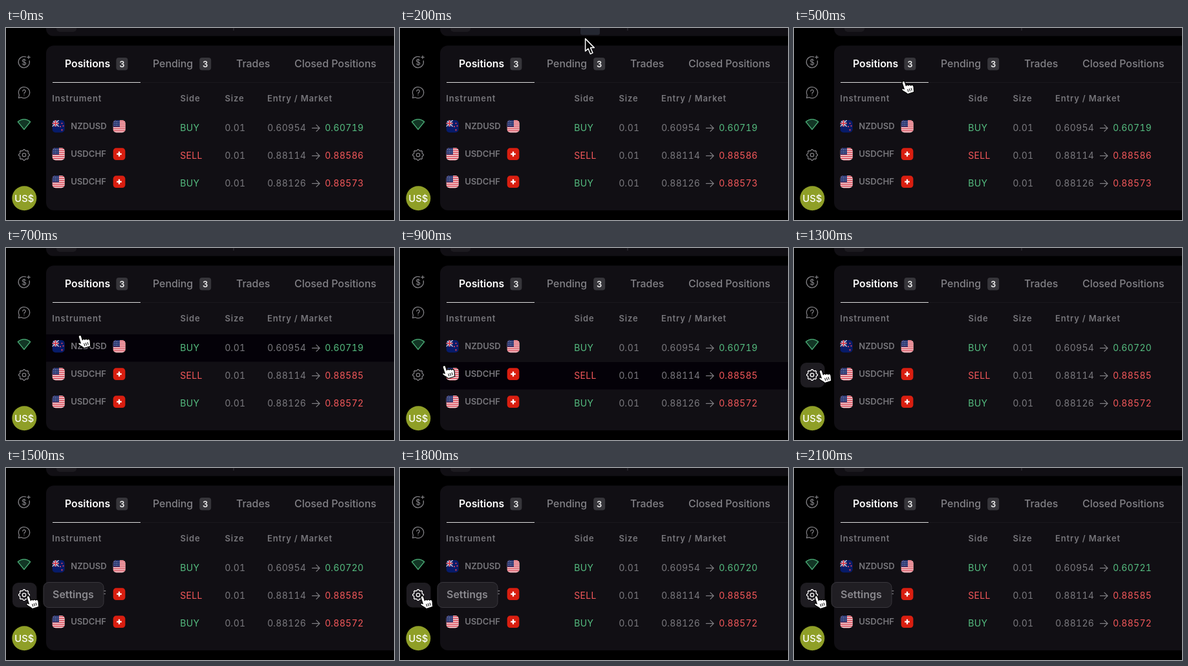
These frames come from a looping animation (600 by 298 pixels, 2.2 s). An HTML page:

```html
<!DOCTYPE html>
<html lang="en">
<head>
<meta charset="utf-8">
<title>Positions</title>
<style>
html, body { margin: 0; width: 100%; height: 100%; overflow: hidden; background: #000; }
svg { display: block; font-family: Inter, "Liberation Sans", sans-serif; }
.tab { font-size: 15.9px; font-weight: 500; fill: #828186; }
.tab.on { font-size: 15.8px; font-weight: 600; fill: #fff; }
.badge { font-size: 13px; font-weight: 600; fill: #eee; text-anchor: middle; }
.head { font-size: 13px; font-weight: 600; letter-spacing: .85px; fill: #77767b; }
.pair { font-size: 13.1px; font-weight: 600; fill: #77767b; }
.cell { font-size: 14px; letter-spacing: .3px; fill: #7b7a7f; }
.digits { font-feature-settings: "tnum"; }
.up { fill: #55bd80; }
.down { fill: #f4585a; }
.icon { fill: none; stroke: #7f7e82; stroke-width: 1.3; stroke-linecap: round; stroke-linejoin: round; }
.tip { font-size: 16px; font-weight: 600; fill: #8a898e; }
</style>
</head>
<body>
<svg id="stage" width="600" height="298" viewBox="0 0 600 298">
  <defs>
    <clipPath id="round"><rect width="19.2" height="19.2" rx="5"/></clipPath>
    <g id="us" clip-path="url(#round)">
      <rect width="20" height="20" fill="#f5f2f2"/>
      <path d="M0 1.5H20M0 4.5H20M0 7.5H20M0 10.5H20M0 13.5H20M0 16.5H20M0 19.5H20" stroke="#d52b3c" stroke-width="1.5"/>
      <rect width="10.5" height="10.5" fill="#25336f"/>
      <path d="M2 2.5H10M2 5.2H10M2 8H10" stroke="#dfe2ef" stroke-width=".9" stroke-dasharray="1 1.5"/>
    </g>
    <g id="nz" clip-path="url(#round)">
      <rect width="20" height="20" fill="#071b69"/>
      <path d="M0 0L10 10M10 0L0 10" stroke="#cdd0e2" stroke-width="1.5"/>
      <path d="M5 0V10M0 5H10" stroke="#dfe0ea" stroke-width="2.6"/>
      <path d="M5 0V10M0 5H10" stroke="#d52b3c" stroke-width="1.5"/>
      <path d="M15 4v2M12.5 9v2M17 8v2M15 14v2.4" stroke="#d0405e" stroke-width="1.8"/>
    </g>
    <g id="ch">
      <rect x=".2" y=".3" width="18.7" height="18.7" rx="4.6" fill="#d91e10"/>
      <path d="M9.5 5.8V13.4M5.7 9.6H13.3" stroke="#fff" stroke-width="2.3"/>
    </g>
  </defs>

  <rect x="62" y="-30" width="570" height="42.5" rx="11" fill="#110f14"/>
  <rect x="78" y="-12" width="31" height="18" rx="5" fill="#1d1b20"/>
  <path d="M352 0V4" stroke="#3a393e"/>
  <rect id="button" x="279" y="-16" width="30" height="26.7" rx="3" fill="#242731"/>
  <rect x="62" y="27.3" width="570" height="255.7" rx="12" fill="#110f14"/>
  <path d="M208 84.5H600" stroke="#1b191e"/>
  <path d="M72 84.5H208" stroke="#dedede"/>
  <rect id="hover" x="62" width="538" height="42.5" fill="#040108"/>
  <g id="table"></g>

  <rect id="gearBox" x="10" y="178" width="37.5" height="38.5" rx="9" fill="#1e1c21"/>
  <g class="icon">
    <path d="M30.6 44.8A8.6 8.6 0 1 0 36.2 51M35 43.2V47.6M32.8 45.4H37.2"/>
    <path d="M30.6 50.4C29.8 48.5 25.3 48.7 25.3 50.9C25.3 53.7 30.7 52 30.7 55.1C30.7 57.5 26.2 57.5 25.2 55.5M28 47.8V58.2" stroke-width="1.1"/>
    <path d="M19.5 108.6L20.4 104.2A8.6 8.6 0 1 1 23.8 107.7Z"/>
    <path d="M25.8 98.1C25.8 95.2 30.3 95.3 30.2 98.1C30.1 100 28 99.8 28 101.7M28 104V104.1"/>
    <path d="M18.3 145.5Q28 137.8 37.7 145.5L28 157.5Z" stroke="#48a873" fill="#123625"/>
    <g id="gear"><path id="teeth"/><circle cx="28" cy="197" r="2.7"/></g>
  </g>
  <circle cx="28.3" cy="264.3" r="19" fill="#8f9f27"/>
  <text x="28.3" y="269.5" font-size="14.7" font-weight="500" fill="#fff" text-anchor="middle">US$</text>

  <g id="tooltip">
    <rect x="58" y="177.5" width="93" height="39" rx="8" fill="#201e23" stroke="#39373d"/>
    <text class="tip" x="72" y="202">Settings</text>
  </g>
  <g id="cursor">
    <path id="arrow" d="M-.4 .6V20L4 16L7.4 24.2L11 22.6L7.6 14.6H13.4Z" fill="#050505" stroke="#fff" stroke-width="1.5" stroke-linejoin="round"/>
    <g id="hand" transform="translate(-1.2 0) rotate(-18) scale(1.12)">
      <path d="M-2 1.5C-2 -1 2 -1 2 1.5V7C2.6 5.6 5 6 5.2 7.6C6 6.4 8.2 7 8.4 8.6C9.4 7.8 11.6 8.4 11.6 10.5C11.6 14 10 15.5 10 18.5H.5C0 16.5 -3 14.5 -5 11.2C-6 9 -3.5 8 -2 10.5Z" fill="#fff" stroke="#000" stroke-width="1.1" stroke-linejoin="round"/>
      <path d="M2.5 12V16M5 12V16M7.5 12V16" stroke="#000" stroke-width=".9"/>
    </g>
  </g>
</svg>
<script>
const $ = id => document.getElementById(id);
const show = (id, on) => $(id).style.display = on ? '' : 'none';
const text = (cls, x, y, s) => `<text class="${cls}" x="${x}" y="${y}">${s}</text>`;
const flag = (id, x, y) => `<use href="#${id}" x="${x}" y="${y}"/>`;
const digits = s => `0.<tspan class="digits">${s}</tspan>`;

let html = '';
[['Positions', 91], ['Pending', 227], ['Trades', 356], ['Closed Positions', 446]].forEach(([name, x], i) =>
  html += text(i ? 'tab' : 'tab on', x, 61, name));
for (const x of [179.4, 308.2])
  html += `<rect x="${x - 9}" y="46" width="18" height="19.5" rx="4" fill="#37363b"/>` + text('badge', x, 60.5, 3);
[['Instrument', 71.3], ['Side', 269.4], ['Size', 338.5], ['Entry / Market', 404]].forEach(([name, x]) =>
  html += text('head', x, 114.3, name));

const rows = [
  ['NZDUSD', 'nz', 'us', 'BUY', '60954', 'up'],
  ['USDCHF', 'us', 'ch', 'SELL', '88114', 'down'],
  ['USDCHF', 'us', 'ch', 'BUY', '88126', 'down']
];
rows.forEach(([pair, from, to, side, entry, trend], i) => {
  const top = 143 + 43 * i, y = 160.4 + 43 * i;
  html += flag(from, 71.5, top) + text('pair', 100.2, top + 14, pair) + flag(to, 165.5, top)
    + text('cell ' + (side === 'BUY' ? 'up' : 'down'), 269.3, y, side)
    + text('cell', 338.5, y, digits('01')) + text('cell', 404.2, y, digits(entry))
    + `<path class="icon" d="M473.5 ${y - 5}h11.5m-5 -5l5 5l-5 5"/>`
    + `<text class="cell ${trend}" id="price${i}" x="493.2" y="${y}"></text>`;
});
$('table').innerHTML = html;

// Eight teeth, four points each
$('teeth').setAttribute('d', 'M' + Array.from({length: 32}, (_, i) => {
  const a = (i - .5) * Math.PI / 16, r = i % 4 < 2 ? 8.4 : 6.9;
  return `${(28 + r * Math.cos(a)).toFixed(2)} ${(197 + r * Math.sin(a)).toFixed(2)}`;
}).join('L') + 'Z');

// Pointer tip every 100 ms; it rests at the last point
const trail = [
  [292, -40], [292, 1], [287, 16], [258, 38], [208, 65], [170, 83], [143, 108], [115, 136],
  [90, 162], [69, 183], [58, 186], [50, 186], [46, 185], [42, 190], [37, 196], [35, 199]
];

function draw(now) {
  const step = Math.floor(now % 2200 / 100);
  const [x, y] = trail[Math.min(step, trail.length - 1)];
  const row = x > 62 && y > 134 ? Math.floor((y - 134) / 43) : -1;
  const onTab = y > 27 && y < 85, onGear = x < 46 && y > 178;
  const pointing = onTab || row >= 0 || onGear;

  $('cursor').setAttribute('transform', `translate(${x} ${y})`);
  show('arrow', !pointing);
  show('hand', pointing);
  show('button', step === 1 || step === 2);
  show('hover', row >= 0);
  $('hover').setAttribute('y', 134 + 43 * Math.max(row, 0));
  show('gearBox', onGear);
  show('tooltip', step >= 14);
  $('gear').style.stroke = onGear ? '#fff' : '';

  const drop = step >= 7 ? 1 : 0;
  const prices = [60719 + (step >= 10) + (step >= 19), 88586 - drop, 88573 - drop];
  prices.forEach((p, i) => $('price' + i).innerHTML = digits(String(p)));
  requestAnimationFrame(draw);
}
draw(performance.now());
</script>
</body>
</html>
```
